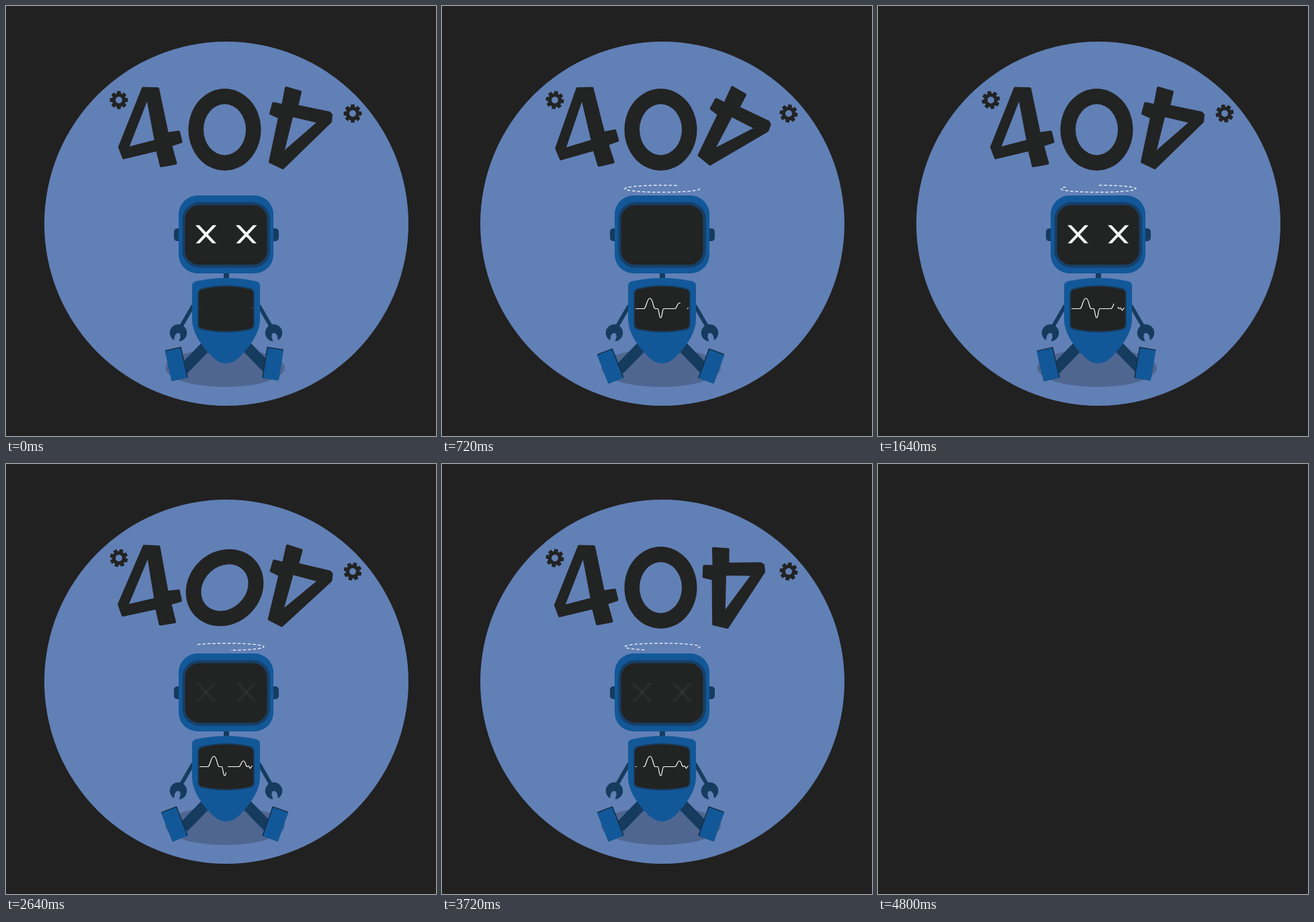
An HTML page with a canvas for the animation above (4840 ms loop, 640 by 640 pixels).

```html
<!DOCTYPE html>
<html lang="en">
<head>
<meta charset="utf-8">
<title>404 robot</title>
<style>
html, body { margin: 0; width: 100%; height: 100%; overflow: hidden; background: #212121; }
canvas { display: block; width: 640px; height: 640px; }
</style>
</head>
<body>
<canvas id="stage" width="640" height="640"></canvas>
<script>
const ctx = document.getElementById('stage').getContext('2d');
const LOOP = 4840, END = 4800, SWING = 2400, BLINK = 1667;
const INK = '#222323', SKY = '#6180b6', BLUE = '#125899', NAVY = '#153b5e';
const TAU = 2 * Math.PI;

// Eased 0 to 1 between two times.
function ramp(t, from, to) {
  const u = Math.min(1, Math.max(0, (t - from) / (to - from)));
  return u * u * (3 - 2 * u);
}

// Eased rise to 1 at the peak and back to 0.
const bump = (t, from, peak, to) => ramp(t, from, peak) - ramp(t, peak, to);

function fill(path, color) {
  ctx.fillStyle = color;
  ctx.fill(path, 'evenodd');
}

function polygon(...points) {
  const path = new Path2D();
  points.forEach(([x, y]) => path.lineTo(x, y));
  path.closePath();
  return path;
}

function ellipse(x, y, rx, ry) {
  const path = new Path2D();
  path.ellipse(x, y, rx, ry, 0, 0, TAU);
  return path;
}

function box(x0, y0, x1, y1, r, color) {
  const path = new Path2D();
  path.roundRect(x0, y0, x1 - x0, y1 - y0, r);
  fill(path, color);
}

function line(x0, y0, x1, y1, width, color) {
  ctx.strokeStyle = color;
  ctx.lineWidth = width;
  ctx.beginPath();
  ctx.moveTo(x0, y0);
  ctx.lineTo(x1, y1);
  ctx.stroke();
}

function turned(x, y, degrees, draw) {
  ctx.save();
  ctx.translate(x, y);
  ctx.rotate(degrees * TAU / 360);
  ctx.translate(-x, -y);
  draw();
  ctx.restore();
}

function mirrored(draw) {
  ctx.save();
  ctx.translate(655, 0);
  ctx.scale(-1, 1);
  draw();
  ctx.restore();
}

const leftFour = polygon([204, 122.5], [226, 123], [240, 190], [257, 187.5], [260.5, 202],
  [245, 207], [252.5, 234], [231, 238], [225, 214], [175, 226], [169, 210]);
leftFour.addPath(polygon([210.5, 135], [223, 201], [180.5, 212]));

const rightFour = polygon([417, 122], [438, 128], [433, 149], [481, 159], [484, 162], [483, 172],
  [412, 241], [393, 232], [407, 166], [394, 160], [398, 145], [412, 148]);
rightFour.addPath(polygon([425.5, 163], [466, 172.5], [411.5, 220]));

const zero = ellipse(325.5, 184, 54, 61);
zero.addPath(ellipse(325.5, 184, 31.5, 38));

function glyph(path) {
  fill(path, INK);
  ctx.strokeStyle = INK;
  ctx.lineWidth = 4;
  ctx.lineJoin = 'round';
  ctx.stroke(path);
}

function drawDigits(t) {
  const c = t % SWING;
  const tilt = 1.5 * bump(c, 0, 240, 450) - 2.5 * bump(c, 450, 700, 1250);
  const swing = 14 * bump(c, 120, 700, 1000) - 12.5 * bump(c, 1000, 1310, 1560);
  turned(214, 180, tilt, () => glyph(leftFour));
  turned(325.5, 184, 180 * ramp(c, 0, 720), () => fill(zero, INK));
  turned(428, 184, swing, () => glyph(rightFour));
}

function drawGear(x, y, degrees) {
  for (let i = 0; i < 8; i++) {
    turned(x, y, degrees + i * 45, () => box(x - 2.9, y - 13.4, x + 2.9, y - 7, 1, INK));
  }
  const ring = ellipse(x, y, 10.3, 10.3);
  ring.addPath(ellipse(x, y, 5, 5));
  fill(ring, INK);
}

// A gap runs around the flat ring; length is measured along x, clockwise from the top.
function drawHalo(t) {
  const s = t / 1000, x = s - .72;
  const middle = .175 - 1.456 * x + .071 * x * x;
  const gap = Math.min(1, .21 + .14 * Math.cos(TAU * (s - 3.75) / 1.2) + Math.exp(-3.5 * s));
  if (gap === 1) return;
  ctx.beginPath();
  for (let i = 0; i <= 200; i++) {
    const f = (middle + gap / 2 + (1 - gap) * i / 200 + 10) % 1;
    const across = f < .25 ? f * 4 : f < .75 ? 2 - f * 4 : f * 4 - 4;
    const down = Math.sqrt(1 - across * across) * (f > .25 && f < .75 ? 1 : -1);
    ctx.lineTo(328 + 56 * across, 272 + 5.2 * down);
  }
  ctx.strokeStyle = '#fff';
  ctx.lineWidth = 1.2;
  ctx.setLineDash([4.5, 3]);
  ctx.stroke();
  ctx.setLineDash([]);
}

const PULSE_LENGTH = 132;
const pulse = new Path2D('M288 450.5H301C304 449 305 435 309.5 435S314 449 317 450.5H321' +
  'C323 451 323 464 325.5 464S327.5 451 330 450.5H347C350 449 350 442 353.5 442' +
  'S356 450 359 450.5L361 449.5L363.5 453L366.5 449');

// The gap closes quickly, then drifts back towards the start of the line.
function drawPulse(t) {
  const gap = .07 + .93 * Math.exp(-t / 280);
  if (gap > .999) return;
  const end = Math.max(gap, 1 - (t / 3850) ** 2.6);
  ctx.strokeStyle = '#fff';
  ctx.lineWidth = 1.2;
  ctx.setLineDash([end - gap, gap, 1.1 - end, 2].map(v => v * PULSE_LENGTH));
  ctx.stroke(pulse);
  ctx.setLineDash([]);
}

function drawArm() {
  line(278.5, 446, 260.5, 477, 5.5, NAVY);
  fill(ellipse(256.5, 486.5, 12.7, 12.7), NAVY);
  turned(256.5, 486.5, 14, () => {
    fill(polygon([253, 502], [252.5, 491], [255, 487], [259, 487], [261, 491], [260.5, 502]), SKY);
  });
}

// Grows outwards from the inner lower corner, with a dark inner and top edge.
function drawFoot(x, y, degrees, side) {
  turned(x, y, degrees, () => {
    ctx.translate(x, y);
    ctx.scale(side, 1);
    box(0, -47, 25, 0, 1, '#14304a');
    box(1.6, -45.5, 25, 0, 1, BLUE);
  });
}

function drawEye(x) {
  ctx.save();
  ctx.beginPath();
  ctx.rect(x - 16, 326.3, 32, 27);
  ctx.clip();
  line(x - 14, 325, x + 14, 355, 4.1, '#fff');
  line(x + 14, 325, x - 14, 355, 4.1, '#fff');
  ctx.restore();
}

const torso = new Path2D('M277 416Q277 411 283 409.5Q328 400 372 409.5Q378 411 378 416' +
  'V466C378 486 364 505 352 518Q340 532 327.5 532Q315 532 303 518C291 505 277 486 277 466Z');
const chest = new Path2D('M286 429Q286 423 291 421Q328 412 364 421Q369 423 369 429' +
  'V474Q369 479 364 481Q328 489 291 481Q286 479 286 474Z');

function drawRobot(t) {
  // Eyes and feet relax together: a quick fall, a pause, a slow rise.
  const c = t % BLINK;
  const rest = Math.max(0, 1 - c / 480) ** 2 + Math.max(0, (c - 810) / (BLINK - 810)) ** 2;

  fill(ellipse(326, 538.5, 89, 28.5), '#4f6691');
  line(299, 505, 264, 541, 16.5, NAVY);
  line(356, 505, 391, 541, 16.5, NAVY);
  drawFoot(271, 553, -21.5 + 9 * rest, -1);
  drawFoot(381, 553.5, 20 - 11 * rest, 1);
  drawArm();
  mirrored(drawArm);

  box(324, 394, 332, 408, 0, NAVY);
  fill(torso, BLUE);
  fill(chest, INK);
  ctx.strokeStyle = '#173f63';
  ctx.lineWidth = 2;
  ctx.stroke(chest);
  drawPulse(t);

  box(250, 331, 266, 350, 5, NAVY);
  box(390, 331, 406, 350, 5, NAVY);
  box(257, 282, 398, 398, 28, BLUE);
  box(262.5, 292, 393, 389.5, 25, '#173f66');
  box(266.5, 296.5, 388.5, 385, 21, INK);
  ctx.globalAlpha = Math.min(1, rest);
  drawEye(297.7);
  drawEye(357.7);
  ctx.globalAlpha = 1;
}

function render(now) {
  const t = now % LOOP;
  ctx.fillStyle = '#212121';
  ctx.fillRect(0, 0, 640, 640);
  if (t < END) {
    fill(ellipse(328, 324, 271, 271), SKY);
    drawGear(168, 140, t * .075);
    drawGear(516, 160, t * .075);
    drawDigits(t);
    drawHalo(t);
    drawRobot(t);
  }
}

const start = performance.now();
function tick() {
  render(performance.now() - start);
  requestAnimationFrame(tick);
}
tick();
</script>
</body>
</html>
```
